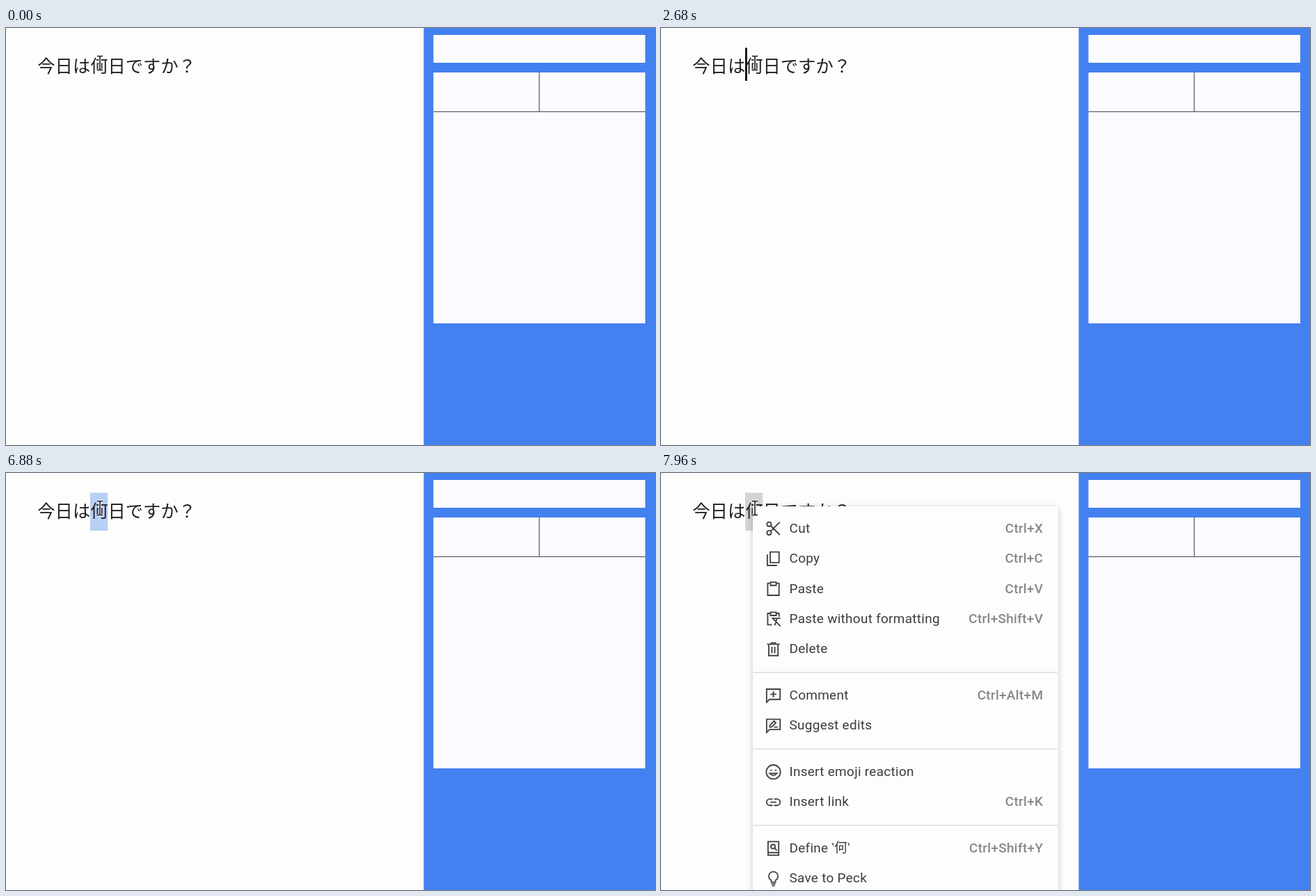
Animation, 933 px wide and 600 px high, one loop 8000 ms. Source, as an HTML page:

```html
<!DOCTYPE html>
<html lang="en">
<head>
<meta charset="utf-8">
<title>Selecting a word</title>
<style>
  html, body { margin: 0; width: 100%; height: 100%; overflow: hidden; background: #fdfdfc; }
  svg { display: block; width: 100%; height: 100%; }
  .line { font: 25.3px "Noto Sans CJK JP", "Noto Sans CJK", sans-serif; fill: #202020; }
  .pad { fill: #fcfbff; }
  .rule { stroke: #45444c; stroke-width: 1; }

  .press, .caret, .mark, .menu { animation: 8s linear infinite; }
  .press { fill: #c4c2c6; opacity: 0; filter: drop-shadow(0 1px 1.5px rgba(0, 0, 0, .5)); }
  .left { animation-name: left; }
  .right { animation-name: right; }
  .caret { fill: #0b0b0b; opacity: 0; animation-name: caret; animation-timing-function: step-end; }
  .mark { fill: #b8cff6; opacity: 0; animation-name: mark; animation-timing-function: step-end; }
  .menu { opacity: 0; animation-name: menu; animation-timing-function: step-end; }

  /* two clicks: 2500 and 2800 ms */
  @keyframes left {
    0%, 31.24% { opacity: 0; }
    31.25%, 31.48% { opacity: 1; }
    33.5%, 34.99% { opacity: 0; }
    35%, 35.23% { opacity: 1; }
    37.25%, 100% { opacity: 0; }
  }
  /* context click: 7140 ms */
  @keyframes right {
    0%, 89.24% { opacity: 0; }
    89.25%, 89.48% { opacity: 1; }
    91.25%, 92.49% { opacity: .1; }
    92.5%, 100% { opacity: 0; }
  }
  @keyframes caret {
    0% { opacity: 0; }
    32.5% { opacity: 1; }
    36.25%, 100% { opacity: 0; }
  }
  @keyframes mark {
    0% { opacity: 0; }
    36.25% { opacity: 1; fill: #b8cff6; }
    92.5%, 100% { opacity: 1; fill: #d3d4d5; }
  }
  @keyframes menu {
    0% { opacity: 0; }
    92.5%, 100% { opacity: 1; }
  }

  .sheet { fill: #fdfdfd; filter: drop-shadow(0 2px 4px rgba(60, 64, 100, .3)); }
  .sep { stroke: #d9dbe6; stroke-width: 1.5; }
  .menu text { font: 19px Roboto, "Noto Sans CJK JP", "Noto Sans CJK", sans-serif; letter-spacing: .27px; fill: #3b3d40; }
  .menu .key { font-weight: 500; fill: #85888c; text-anchor: end; }
  .icon { fill: none; stroke: #3f4144; stroke-width: 1.8; }
  .beam { fill: none; stroke: #fff; stroke-width: 3.6; }
  .beam + .beam { stroke: #111; stroke-width: 1.5; }
</style>
</head>
<body>
<svg viewBox="0 0 933 600" preserveAspectRatio="none">
  <rect width="933" height="600" fill="#fdfdfc"/>
  <rect class="mark" x="121" y="28.5" width="25.3" height="54.5"/>
  <text class="line" x="45.3" y="63.6">今日は何日ですか？</text>
  <rect class="caret" x="121" y="28.5" width="2.8" height="47.5"/>

  <rect x="600.5" width="332.5" height="600" fill="#4381f0"/>
  <rect class="pad" x="614.5" y="10" width="304.5" height="40"/>
  <rect class="pad" x="614.5" y="64" width="304.5" height="361"/>
  <rect class="press left" x="614.5" y="64" width="152.5" height="57"/>
  <rect class="press right" x="766.5" y="64" width="152.5" height="57"/>
  <path class="rule" d="M614.5 120.5H919M766.5 64V120.5"/>

  <g class="menu" id="menu">
    <rect class="sheet" x="132" y="48" width="439" height="580" rx="3"/>
    <path class="sep" d="M133 287H570M133 397H570M133 507H570"/>
  </g>

  <path class="beam" d="M131 40.5h3l1 1 1-1h3M135 41.5V59.5M131 60.5h3l1-1 1 1h3"/>
  <path class="beam" d="M131 40.5h3l1 1 1-1h3M135 41.5V59.5M131 60.5h3l1-1 1 1h3"/>
</svg>
<script>
  const board = 'M8 4H4V21H20V4H16M8 2.5H16V7H8Z';
  const bubble = 'M2.5 3H21.5V17.5H6.5L2.5 21.5Z';
  // centre y, label, shortcut, icon path on a 24 unit grid
  const rows = [
    [79, 'Cut', 'Ctrl+X', 'M3 6a3 3 0 1 0 6 0a3 3 0 1 0-6 0M3 18a3 3 0 1 0 6 0a3 3 0 1 0-6 0M8 8L21 21M8 16L21 3'],
    [122.5, 'Copy', 'Ctrl+C', 'M7.5 2.5H20V17.5H7.5ZM3.5 6V21.5H17'],
    [166, 'Paste', 'Ctrl+V', board],
    [209.3, 'Paste without formatting', 'Ctrl+Shift+V', 'M8 4H4V20H10M16 4H20V9M8 2.5H16V7H8ZM11 11H22M17 11L14 21M10 10L22 22'],
    [252.7, 'Delete', '', 'M3 5H21M9 4.5V3H15V4.5M5.5 5V21H18.5V5M10 8.5V17.5M14 8.5V17.5'],
    [319.3, 'Comment', 'Ctrl+Alt+M', bubble + 'M12 6V14.5M7.8 10.2H16.2'],
    [362.7, 'Suggest edits', '', bubble + 'M7 14V11.5L13 5.5L15.5 8L9.5 14ZM13 14H18'],
    [429.4, 'Insert emoji reaction', '', 'M2 12a10 10 0 1 0 20 0a10 10 0 1 0-20 0M7.5 9.5h2.4M14.1 9.5h2.4M7 14Q12 20 17 14Z'],
    [472.8, 'Insert link', 'Ctrl+K', 'M11 7.5H7a4.5 4.5 0 0 0 0 9H11M13 7.5H17a4.5 4.5 0 0 1 0 9H13M8 12H16'],
    [539.3, "Define '何'", 'Ctrl+Shift+Y', 'M4.5 2.5H19.5V21.5H4.5ZM4.5 18H19.5M8.5 9.5a3 3 0 1 0 6 0a3 3 0 1 0-6 0M13.7 11.7L17 15'],
    [582.7, 'Save to Peck', '', 'M9 17V14.5a6.5 6.5 0 1 1 6 0V17ZM9 19.5H15M10 22H14']
  ];
  const menu = document.getElementById('menu');
  const add = (tag, attrs, text = '') => {
    const el = document.createElementNS('http://www.w3.org/2000/svg', tag);
    for (const k in attrs) el.setAttribute(k, attrs[k]);
    el.textContent = text;
    menu.append(el);
  };
  for (const [y, label, key, d] of rows) {
    add('path', { class: 'icon', d, transform: `translate(149.3 ${y - 11.4}) scale(1.02)` });
    add('text', { x: 184.5, y: y + 6.6 }, label);
    if (key) add('text', { class: 'key', x: 549.3, y: y + 6.6 }, key);
  }
</script>
</body>
</html>
```
